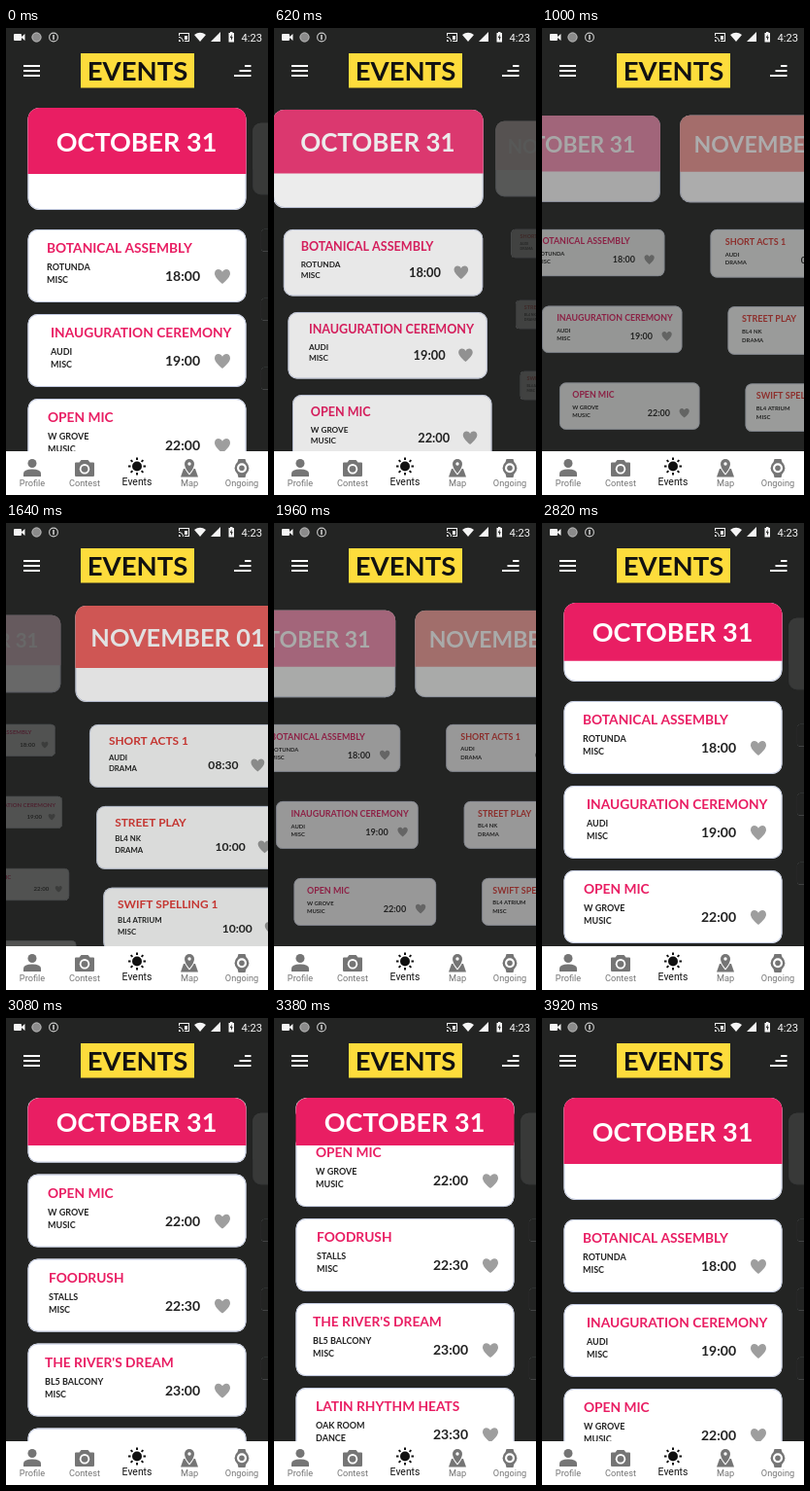
Animation, 270 px wide and 480 px high, one loop 3.96 s. Source, as an HTML page with a canvas:

```html
<!DOCTYPE html>
<html lang="en">
<head>
<meta charset="utf-8">
<title>Events</title>
<style>
html, body { margin: 0; width: 100%; height: 100%; overflow: hidden; background: #232423; }
canvas { display: block; width: 270px; height: 480px; }
</style>
</head>
<body>
<canvas width="270" height="480"></canvas>
<script>
const ctx = document.querySelector('canvas').getContext('2d');
const LOOP = 3960;
const BACK = '#232423', GREY = '#757575';

// Keys are [ms, value]
const SWIPE = [[0, 0], [260, .02], [540, .08], [1000, .512], [1300, .74], [1580, .816],
  [1640, .807], [1960, .5], [2300, .083], [2500, 0], [LOOP, 0]];
const SCROLL = [[0, 0], [2740, 0], [2900, 70], [3080, 220], [3260, 268], [3380, 262],
  [3600, 110], [3800, 6], [3900, 0], [LOOP, 0]];

// Card: title, place, kind, time, text inset
const PAGES = [
  { title: 'OCTOBER 31', rgb: [233, 30, 99], cards: [
    ['BOTANICAL ASSEMBLY', 'ROTUNDA', 'MISC', '18:00', 19.5],
    ['INAUGURATION CEREMONY', 'AUDI', 'MISC', '19:00', 23.5],
    ['OPEN MIC', 'W GROVE', 'MUSIC', '22:00', 20.5],
    ['FOODRUSH', 'STALLS', 'MISC', '22:30', 21.5],
    ["THE RIVER'S DREAM", 'BL5 BALCONY', 'MISC', '23:00', 17.5],
    ['LATIN RHYTHM HEATS', 'OAK ROOM', 'DANCE', '23:30', 20.5]] },
  { title: 'NOVEMBER 01', rgb: [229, 57, 53], cards: [
    ['SHORT ACTS 1', 'AUDI', 'DRAMA', '08:30', 23],
    ['STREET PLAY', 'BL4 NK', 'DRAMA', '10:00', 22],
    ['SWIFT SPELLING 1', 'BL4 ATRIUM', 'MISC', '10:00', 17]] }
];

// Monotone cubic through the keys
function sample(keys, t) {
  const slope = i => (keys[i + 1][1] - keys[i][1]) / (keys[i + 1][0] - keys[i][0]);
  const tangent = i => {
    if (i < 1 || i > keys.length - 2) return 0;
    const a = slope(i - 1), b = slope(i);
    return a * b > 0 ? 2 * a * b / (a + b) : 0;
  };
  let i = 0;
  while (i < keys.length - 2 && t >= keys[i + 1][0]) i++;
  const [t0, v0] = keys[i], [t1, v1] = keys[i + 1], w = t1 - t0, x = (t - t0) / w;
  return v0 + (v1 - v0) * x * x * (3 - 2 * x)
    + w * x * (1 - x) * ((1 - x) * tangent(i) - x * tangent(i + 1));
}

function rect(x, y, w, h, fill, r = 0) {
  ctx.beginPath();
  ctx.roundRect(x, y, w, h, r);
  ctx.fillStyle = fill;
  ctx.fill();
}

function shape(d, fill, x = 0, y = 0) {
  ctx.save();
  ctx.translate(x, y);
  ctx.fillStyle = fill;
  ctx.fill(new Path2D(d), 'evenodd');
  ctx.restore();
}

function disc(x, y, r, fill) {
  rect(x - r, y - r, 2 * r, 2 * r, fill, r);
}

function ring(x, y, r, width, color) {
  ctx.beginPath();
  ctx.arc(x, y, r, 0, 7);
  ctx.lineWidth = width;
  ctx.strokeStyle = color;
  ctx.stroke();
}

function rays(x, y, n, r0, r1, width, color) {
  ctx.beginPath();
  for (let i = 0; i < n; i++) {
    const a = i / n * 2 * Math.PI, c = Math.cos(a), s = Math.sin(a);
    ctx.moveTo(x + c * r0, y + s * r0);
    ctx.lineTo(x + c * r1, y + s * r1);
  }
  ctx.lineWidth = width;
  ctx.strokeStyle = color;
  ctx.stroke();
}

function text(str, x, y, size, color, weight = 700, align = 'left', family = 'Lato') {
  ctx.font = `${weight} ${size}px ${family}, sans-serif`;
  ctx.textAlign = align;
  ctx.fillStyle = color;
  ctx.fillText(str, x, y);
}

function outline(w, h, r) {
  ctx.beginPath();
  ctx.roundRect(.5, .5, w - 1, h - 1, r);
  ctx.lineWidth = 1;
  ctx.strokeStyle = '#c3cbe2';
  ctx.stroke();
}

// Draws a panel at a scale, then fades it as one layer into the background
function panel(cx, top, height, scale, alpha, draw) {
  ctx.save();
  ctx.translate(cx - 112.5 * scale, top);
  ctx.scale(scale, scale);
  draw();
  if (alpha < 1) {
    ctx.globalAlpha = 1 - alpha;
    rect(-1, -1, 227, height + 2, BACK, 11);
  }
  ctx.restore();
}

function drawCard([title, where, kind, time, inset], color) {
  rect(0, 0, 225, 75, '#fff', 10);
  outline(225, 75, 10);
  text(title, inset, 24, 13.75, color);
  text(where, inset, 42.3, 9, '#222');
  text(kind, inset, 55.2, 9, '#222');
  text(time, 141.5, 53.2, 14, '#222');
  shape('M0 7.5C-5 3.5-8-.2-8-3.2C-8-8-2.2-9 0-4.8C2.2-9 8-8 8-3.2C8-.2 5 3.5 0 7.5Z', '#9e9e9e', 200.5, 48.5);
}

function drawPage({ title, rgb, cards }, d, scroll) {
  const a = Math.abs(d), bend = Math.min(a, 1 - a);
  const cx = 135 + Math.sign(d) * (198 * a + 27 * a * (1 - a));
  const color = `rgb(${rgb})`;

  ctx.save();
  if (scroll > 0) {
    ctx.beginPath();
    ctx.roundRect(22, 82, 226, 400, 12);
    ctx.clip();
  }
  cards.forEach((card, i) => {
    const x = cx + 37 * bend * (i + 1) - 36 * d * a;
    const y = 207 + i * (87 - 16 * a) - scroll;
    panel(x, y, 75, 1 - .7 * a, 1 - a ** 1.1, () => drawCard(card, color));
  });

  const fold = Math.min(scroll / 56, 1);
  const height = 105 - 56 * fold, band = 68 - 19 * fold;
  const scale = 1 - .3 * a;
  const top = 82 + 52.5 * (1 - scale);
  panel(cx, top, height, scale, 1 - .65 * a - .25 * a * a, () => {
    if (height > band) {
      rect(0, 0, 225, height, '#fff', 12);
      outline(225, height, 12);
    }
    const tint = rgb.map(c => Math.round(c + (255 - c) * a));
    rect(0, 0, 225, band, `rgb(${tint})`, [12, 12, 0, 0]);
    text(title, 112, band / 2 + 10.5, 27, '#fff', 700, 'center');
  });
  ctx.restore();
}

function drawStatus() {
  const white = '#f5f5f5';
  rect(8, 6, 8, 7, white, 1);
  shape('M16 9L19.5 6V13L16 10Z', white);
  disc(31.5, 9.5, 4.8, '#8b8b8b');
  ring(31.5, 9.5, 4.6, 1, '#bbb');
  ring(49, 9.5, 4.4, 1.1, '#ccc');
  rect(48.2, 7, 1.6, 5, '#ccc');
  shape('M178 5H189V14H184V13H188V6H179V8H178ZM178 12A2 2 0 0 1 180 14H178ZM178 9A5 5 0 0 1 183 14H182A4 4 0 0 0 178 10ZM184 8H187V12H184Z', white);
  shape('M194 7Q200 2.5 206 7L200 14Z', white);
  shape('M221 4V14H211Z', white);
  shape('M229.5 5H231V4H233.5V5H235V14.5H229.5ZM232.6 6.5L230.8 10H232V13L233.8 9.3H232.6Z', white);
  text('4:23', 264, 13.5, 11.2, white, 400, 'right', 'Roboto');
}

function drawTop() {
  rect(77, 26, 117, 35.5, '#fddc3c');
  text('EVENTS', 135.5, 53.5, 27.5, '#111', 700, 'center');
  [0, 1, 2].forEach(i => {
    rect(18, 38 + i * 5, 17, 2, '#fff');
    rect(246 - i * 5.5, 38 + i * 5, 6.5 + i * 5.5, 2, '#fff');
  });
}

function drawNav() {
  rect(0, 435, 270, 45, '#fff');
  disc(27, 447.5, 4.5, GREY);
  shape('M18 461V458Q18 453.5 27 453.5T36 458V461Z', GREY);

  shape('M77.5 444H84.5L86.5 446.5H90Q91 446.5 91 447.5V459.5Q91 461 90 461H72Q71 461 71 459.5V447.5Q71 446.5 72 446.5H75.5Z', GREY);
  disc(81, 453.3, 5.2, '#fff');
  disc(81, 453.3, 3.4, GREY);

  disc(135, 450.5, 5, '#111');
  rays(135, 450.5, 8, 6.5, 9, 2, '#111');

  shape('M183 453H195L198 461.5H180Z', GREY);
  ctx.lineWidth = 2;
  ctx.strokeStyle = '#fff';
  const pin = 'M189 443A5 5 0 0 1 194 448Q194 452 189 458Q184 452 184 448A5 5 0 0 1 189 443Z';
  ctx.stroke(new Path2D(pin));
  shape(pin, GREY);
  disc(189, 448, 1.7, '#fff');

  shape('M239.5 443H246.5L248 448H238ZM238 456H248L246.5 462H239.5Z', GREY);
  disc(243, 452.3, 7.4, GREY);
  disc(243, 452.3, 5, '#fff');
  disc(243, 452.3, 2.8, GREY);

  ['Profile', 'Contest', 'Events', 'Map', 'Ongoing'].forEach((label, i) => {
    const on = i === 2;
    text(label, 27 + i * 54, on ? 470 : 471.3, on ? 10.4 : 9.2, on ? '#111' : GREY, 400, 'center', 'Roboto');
  });
}

function frame(now) {
  const t = now % LOOP;
  const swipe = sample(SWIPE, t), scroll = sample(SCROLL, t);
  rect(0, 0, 270, 480, BACK);
  drawPage(PAGES[1], 1 - swipe, 0);
  drawPage(PAGES[0], -swipe, scroll);
  drawStatus();
  drawTop();
  drawNav();
  requestAnimationFrame(frame);
}
requestAnimationFrame(frame);
</script>
</body>
</html>
```
